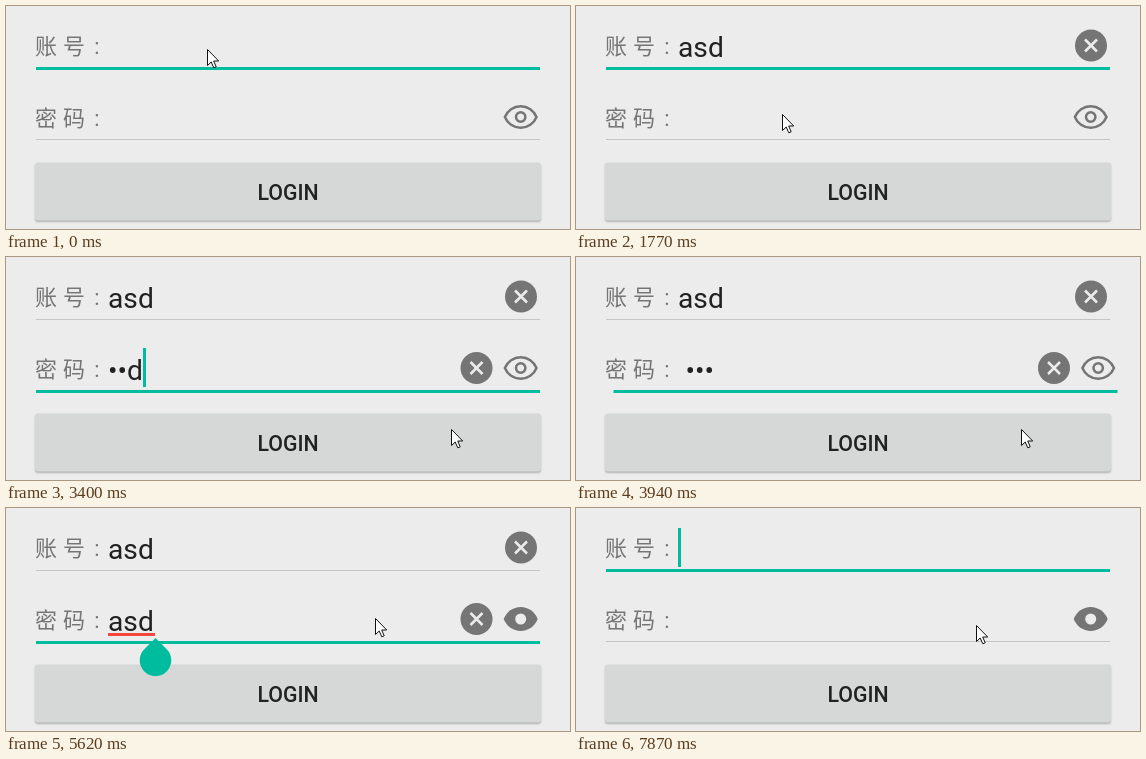
Recreate the animation shown at these times as an HTML page with a canvas. Size 564x223 px, loop 8 s.

```html
<!DOCTYPE html>
<html lang="zh-CN">
<head>
<meta charset="utf-8">
<title>Login form</title>
<style>
  html, body { margin: 0; width: 100%; height: 100%; overflow: hidden; background: #ececec; }
  canvas { display: block; }
</style>
</head>
<body>
<canvas id="stage" width="564" height="223"></canvas>
<script>
const ctx = document.getElementById('stage').getContext('2d');
const LOOP = 8000, BG = '#ececec', TEAL = '#00bc9f', GRAY = '#757575', INK = '#212121';
const INPUT_FONT = '28.2px Roboto, sans-serif';
const ROW = 71.5, TEXT_X = 102;

// time, x, y of the mouse pointer
const pointerPath = [
  [0, 201, 43], [1000, 201, 43], [1460, 208, 104], [1580, 206, 108],
  [2460, 206, 108], [2980, 483, 129], [3400, 445, 172], [4300, 445, 172],
  [4780, 514, 110], [5090, 514, 110], [5560, 366, 109], [5620, 369, 110],
  [5980, 461, 108], [6220, 461, 108], [6700, 518, 34], [6900, 518, 34],
  [7540, 400, 117], [LOOP, 400, 117]
];
const accountCaret = [[180, 1460], [6880, 7370], [7870, LOOP]];
const passwordCaret = [[1830, 2900], [3400, 3900], [4300, 4780], [5030, 5530], [5980, 6700]];

const within = (t, spans) => spans.some(([from, to]) => t >= from && t < to);
const typed = (t, times) => 'asd'.slice(0, times.filter(at => t >= at).length);

function rect(x, y, w, h, color) {
  ctx.fillStyle = color;
  ctx.fillRect(x, y, w, h);
}

function text(s, x, y, font, color, align = 'left') {
  ctx.font = font;
  ctx.fillStyle = color;
  ctx.textAlign = align;
  ctx.fillText(s, x, y);
}

function disc(x, y, r, color) {
  ctx.fillStyle = color;
  ctx.beginPath();
  ctx.arc(x, y, r, 0, Math.PI * 2);
  ctx.fill();
}

function label(chars, y) {
  const font = '22px "Noto Sans CJK SC", "Noto Sans CJK", sans-serif';
  text(chars[0], 29, y, font, GRAY);
  text(chars[1], 57, y, font, GRAY);
  text(':', 91, y, '22px Roboto, sans-serif', GRAY, 'center');
}

function clearIcon(x, y) {
  disc(x, y, 16, GRAY);
  ctx.strokeStyle = BG;
  ctx.lineWidth = 2.5;
  ctx.stroke(new Path2D(`M${x - 6} ${y - 6}l12 12m0 -12l-12 12`));
}

function eyeIcon(x, y, open) {
  const w = open ? 17 : 15.8, h = open ? 12 : 10.8;
  const shape = new Path2D(`M${-w} 0C${-w * .84} ${-h * .59} ${-w * .45} ${-h} 0 ${-h}
    S${w * .84} ${-h * .59} ${w} 0C${w * .84} ${h * .59} ${w * .45} ${h} 0 ${h}
    S${-w * .84} ${h * .59} ${-w} 0Z`);
  ctx.save();
  ctx.translate(x, y);
  if (open) {
    ctx.fillStyle = GRAY;
    ctx.fill(shape);
    disc(0, 0, 5.5, BG);
  } else {
    ctx.strokeStyle = GRAY;
    ctx.lineWidth = 2.5;
    ctx.stroke(shape);
    ctx.beginPath();
    ctx.arc(0, 0, 4.7, 0, Math.PI * 2);
    ctx.stroke();
  }
  ctx.restore();
}

function field(top, value, focused, caret, shift = 0) {
  const x = TEXT_X + shift;
  if (focused) rect(30 + shift, Math.round(61 + top), 504, 3, TEAL);
  else rect(30 + shift, Math.floor(62 + top), 504, 1, '#c5c5c5');
  text(value, x, 51 + top, INPUT_FONT, INK);
  if (caret) rect(Math.round(x + ctx.measureText(value).width), Math.round(19.5 + top), 3, 39, TEAL);
}

function button(pressed) {
  ctx.save();
  ctx.shadowColor = pressed ? 'rgba(0,0,0,.35)' : 'rgba(0,0,0,.25)';
  ctx.shadowOffsetY = pressed ? 2.5 : 1.5;
  ctx.shadowBlur = pressed ? 4 : 2;
  ctx.fillStyle = pressed ? '#cbcccc' : '#d6d7d7';
  ctx.beginPath();
  ctx.roundRect(29, 156.5, 506, 58, 3);
  ctx.fill();
  ctx.restore();
  text('LOGIN', 282, 194, '500 21.3px Roboto, sans-serif', INK, 'center');
}

function handle(x, y) {
  ctx.fillStyle = TEAL;
  ctx.fill(new Path2D(`M${x} ${y}l11.2 11.2a15.8 15.8 0 1 1 -22.4 0Z`));
}

function pointer(t) {
  const i = pointerPath.findIndex(p => p[0] > t);
  const [t0, x0, y0] = pointerPath[i - 1], [t1, x1, y1] = pointerPath[i];
  const u = (t - t0) / (t1 - t0), k = u * u * (3 - 2 * u);
  const x = Math.round(x0 + (x1 - x0) * k), y = Math.round(y0 + (y1 - y0) * k);
  const arrow = new Path2D(`M${x + .5} ${y + .5}v16l3.7 -3.5l2.6 5.8l2.4 -1l-2.5 -5.8h5Z`);
  ctx.fillStyle = '#fff';
  ctx.fill(arrow);
  ctx.strokeStyle = '#111';
  ctx.lineWidth = 1;
  ctx.stroke(arrow);
}

function draw(t) {
  const onAccount = t < 1830 || t >= 6880;
  const revealed = t >= 5030;
  const account = t < 6880 ? typed(t, [700, 830, 960]) : '';
  const secret = t < 6220 ? typed(t, [2200, 2300, 2400]) : '';
  const hidden = t < 3900 ? secret.length - 1 : secret.length;
  const password = revealed ? secret : secret.replace(/./g, (c, i) => i < hidden ? '•' : c);
  const shaking = t > 3610 && t < 4050;
  const shift = shaking ? 7.5 * Math.sin((t - 3610) / 440 * 6 * Math.PI) : 0;

  rect(0, 0, 564, 223, BG);
  label('账号', 48);
  label('密码', 48 + ROW);
  field(0, account, onAccount, within(t, accountCaret));
  field(ROW, password, !onAccount, within(t, passwordCaret), shift);
  if (account) clearIcon(515, 39.5);
  if (secret) clearIcon(470.5 + shift, 111);
  eyeIcon(514.7 + shift, 111, revealed);
  button(t >= 3580 && t < 3760);
  if (revealed && secret) {
    if (t >= 5280) rect(102, 125, 47, 3, '#f4483f');
    handle(149.5, 130);
  }
  pointer(t);
}

function frame() {
  draw(performance.now() % LOOP);
  requestAnimationFrame(frame);
}
frame();
</script>
</body>
</html>
```
